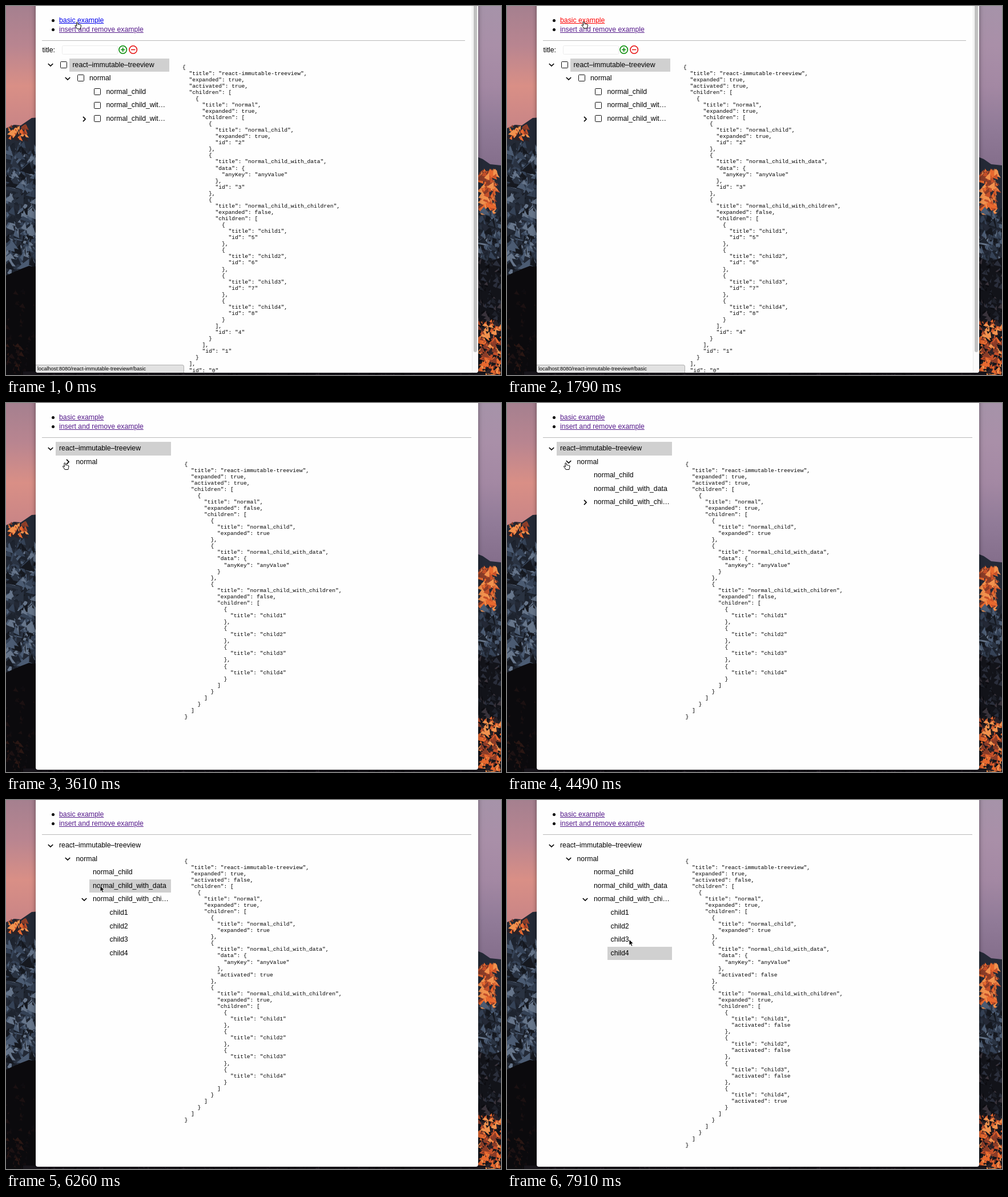
Animation of 867x646 px, one loop 8 s. Source, as an HTML page with a canvas:

```html
<!DOCTYPE html>
<html lang="en">
<head>
<meta charset="utf-8">
<title>Tree view demo</title>
<style>
html, body { margin: 0; width: 867px; height: 646px; overflow: hidden; background: #111; }
body { position: relative; font: 12.25px "Liberation Sans", Arial, sans-serif; color: #000; }
canvas, svg, #page, #page > * { position: absolute; }
#page { inset: 0; background: #fefefe; clip-path: inset(0 40px 4px 52px round 0 0 4px 4px); }
#links { left: 93px; top: 16.8px; line-height: 16.3px; }
#links div { position: relative; }
#links div::before { content: ""; position: absolute; left: -13.5px; top: 6px; width: 5px; height: 5px; border-radius: 50%; background: #000; }
#links span { text-decoration: underline; color: #551a8b; }
#rule { left: 63px; top: 60px; height: 1px; background: #b9b9b9; }
#form { left: 0; top: 0; }
#tree { left: 0; line-height: 23.6px; white-space: nowrap; }
.row { position: relative; height: 23.6px; }
.row svg { top: 4.8px; overflow: visible; }
.row i { position: absolute; top: 5.3px; width: 10px; height: 10px; border: 1.5px solid #111; border-radius: 1.5px; }
.label { padding-left: 6px; }
.on { background: #d0d0d0; }
.kids { overflow: hidden; }
pre { margin: 0; top: 101.5px; font: 9.58px/11.07px "Liberation Mono", "Courier New", monospace; }
pre mark { background: #b0d3fb; color: inherit; }
#track { left: 816px; top: 0; width: 11px; height: 642px; background: #fafafa; box-shadow: inset 1px 0 #e8e8e8; }
#track::before { content: ""; position: absolute; left: 3px; top: -4px; width: 6px; height: 610px; border-radius: 3px; background: #c1c1c1; }
#status { left: 51px; top: 628px; width: 256px; height: 13px; padding-left: 3px; border: 1px solid #b0b0b0; border-radius: 0 3px 0 0;
  background: #e2e2e2; font-size: 9px; line-height: 13px; box-sizing: content-box; }
</style>
</head>
<body>
<canvas id="wall" width="867" height="646"></canvas>
<div id="page">
  <div id="links"><div><span>basic example</span></div><div><span>insert and remove example</span></div></div>
  <div id="rule"></div>
  <svg id="form" width="300" height="90" fill="none" stroke-width="1.6">
    <text x="63.5" y="81" fill="#000">title:</text>
    <rect x="98.5" y="69.5" width="97" height="15" rx="2" stroke="#ececec" stroke-width="1"/>
    <path d="M201 76.5h7.4M204.7 72.8v7.4" stroke="#008a00"/><circle cx="204.7" cy="76.5" r="6.7" stroke="#008a00"/>
    <path d="M219 76.5h7.4" stroke="#e60f0f"/><circle cx="222.7" cy="76.5" r="6.7" stroke="#e60f0f"/>
  </svg>
  <div id="tree"></div>
  <pre id="json"></pre>
  <div id="track"></div>
  <div id="status"></div>
</div>
<svg width="867" height="646" style="left:0;top:0">
  <path id="hand" d="M-1.2 1Q0-.6 1 1L1.6 4.3Q3 3.6 3.6 4.6Q5 4 5.4 5Q7 4.6 7 6.5L6.5 9L5.8 12H0L-1.5 9.5L-3.6 6.8Q-3.4 5.4-2 6L-.6 7.2Z" fill="#fff" stroke="#000"/>
  <path id="arrow" d="M0 0V10.3L2.3 8.2L4 12L5.8 11.2L4.2 7.5H7.3Z" stroke="#fff" stroke-width=".8"/>
</svg>
<script>
const $ = id => document.getElementById(id);
const LOOP = 8000, ROW = 23.6, TURN = 300;
const ROOT = 'react-immutable-treeview';

// The screen refreshes in bursts: [from, to, number of intervals]
const bursts = [[0, 150, 1], [150, 860, 4], [860, 1150, 2], [1360, 1790, 3], [1790, 2260, 3],
  [2410, 2860, 3], [3160, 3610, 3], [3610, 4200, 4], [4350, 5370, 7], [5520, 6440, 6],
  [6590, 7180, 4], [7180, 7620, 3], [7760, 7910, 1]];
const ticks = bursts.flatMap(([a, b, n]) => Array.from({length: n + 1}, (_, i) => a + (b - a) * i / n));

// Pointer path: time, x, y
const path = [[0, 124.5, 28], [330, 124.5, 28], [860, 143.5, 44], [1360, 143.5, 44], [1790, 134.5, 27],
  [1940, 134.5, 27], [2260, 112, 108], [2710, 103, 104.5], [4350, 103, 104.5], [4780, 137.5, 180],
  [5520, 137.5, 180], [5980, 165, 150], [6440, 165, 150], [6735, 198, 196], [7030, 206, 219],
  [7180, 224, 240], [7470, 219, 244], [7620, 219, 244], [7760, 215, 266], [7910, 214, 244]];

const picks = [[0, ROOT], [6130, 'normal_child_with_data'], [6735, 'child1'], [7030, 'child2'],
  [7470, 'child3'], [7760, 'child4']];

const within = (t, a, b) => t >= a && t < b;
const clamp = v => Math.max(0, Math.min(1, v));

function pointer(t) {
  const i = path.findIndex(p => p[0] > t);
  if (i < 0) return path[path.length - 1].slice(1);
  const [a, x, y] = path[i - 1], [b, u, v] = path[i], k = (t - a) / (b - a);
  return [x + (u - x) * k, y + (v - y) * k];
}

function model(t, insert) {
  const nodes = {};
  const node = (id, title, rest) => nodes[title] = {title, ...rest, ...(insert && {id: String(id)})};
  const kids = [1, 2, 3, 4].map(n => node(n + 4, 'child' + n));
  const root = node(0, ROOT, {expanded: true, activated: true, children: [
    node(1, 'normal', {expanded: !within(t, 3160, 3755), children: [
      node(2, 'normal_child', {expanded: true}),
      node(3, 'normal_child_with_data', {data: {anyKey: 'anyValue'}}),
      node(4, 'normal_child_with_children', {expanded: t >= 5220, children: kids})
    ]})
  ]});
  const past = picks.filter(p => p[0] <= t);
  past.forEach(([, title], i) => nodes[title].activated = i === past.length - 1);
  return root;
}

// How far a node is unfolded, 0 to 1
function unfold(title, t) {
  if (title === 'normal') return t < 3755 ? 1 - clamp((t - 3160) / TURN) : clamp((t - 3755) / TURN);
  if (title === 'normal_child_with_children') return clamp((t - 5220) / TURN);
  return 1;
}

function rows(node, t, insert, depth = 0) {
  const {title, children, activated} = node;
  const x = 78 + 29.5 * depth, max = insert ? 16 : 22;
  let label = title.replace(/-/g, '\u2013');
  if (depth > 1 && label.length > max) label = label.slice(0, Math.min(max, 21)) + '\u2026';
  const open = unfold(title, t);
  let html = '<div class="row">';
  if (children) html += `<svg width="14" height="14" viewBox="-7 -7 14 14" style="left:${x - 7}px">
    <path d="M-2-4.2L2 0L-2 4.2" transform="rotate(${90 * open})" fill="none" stroke="#000" stroke-width="1.7"/></svg>`;
  if (insert) html += `<i style="left:${x + 17}px"></i>`;
  html += `<div class="label${activated ? ' on' : ''}" style="margin-left:${x + (insert ? 32.5 : 9)}px">${label}</div></div>`;
  if (children && open > 0) {
    const height = open < 1 ? `height:${children.length * ROW * open}px` : '';
    html += `<div class="kids" style="${height}">${children.map(c => rows(c, t, insert, depth + 1)).join('')}</div>`;
  }
  return html;
}

function draw(t) {
  const insert = t < 320 || within(t, 1000, 1935);
  const root = model(t, insert);
  const [basic, edit] = document.querySelectorAll('#links span');
  basic.style.color = within(t, 150, 320) || within(t, 1785, 1935) ? '#f00' : t < 150 ? '#00e' : '';
  edit.style.color = within(t, 855, 1000) ? '#f00' : '';
  $('rule').style.width = (insert ? 741 : 752) + 'px';
  $('form').style.display = $('track').style.display = insert ? '' : 'none';

  $('tree').style.top = (insert ? 91.6 : 68) + 'px';
  $('tree').style.width = (insert ? 286 : 289) + 'px';
  $('tree').innerHTML = rows(root, t, insert);
  const text = JSON.stringify(root, null, 2);
  $('json').style.left = (insert ? 309 : 312.5) + 'px';
  $('json').innerHTML = within(t, 5220, 5975) ? '<mark>{</mark>' + text.slice(1) : text;

  const [x, y] = pointer(t);
  const onEdit = within(t, 500, 1500);
  $('status').textContent = `localhost:8080/${ROOT}#/${onEdit ? 'insert_remove' : 'basic'}`;
  $('status').style.opacity = 1 - clamp((t - 2200) / 500);

  const hand = t < 2080 || within(t, 2550, 5600);
  $('hand').style.display = hand ? '' : 'none';
  $('arrow').style.display = hand ? 'none' : '';
  $(hand ? 'hand' : 'arrow').setAttribute('transform', `translate(${x} ${y})`);
}

function wallpaper() {
  const g = $('wall').getContext('2d');
  let seed = 7;
  const rnd = () => (seed = seed * 16807 % 2147483647) / 2147483647;
  const sky = (x, w, stops) => {
    const fill = g.createLinearGradient(0, 0, 0, 280);
    stops.forEach((c, i) => fill.addColorStop(i / (stops.length - 1), c));
    g.fillStyle = fill;
    g.fillRect(x, 0, w, 646);
  };
  const shape = (color, pts) => {
    g.beginPath();
    pts.forEach(p => g.lineTo(...p));
    g.fillStyle = color;
    g.fill();
  };
  const shards = (x, y, w, h, n, size, colors) => {
    for (let i = 0; i < n; i++) {
      const a = x + rnd() * w, b = y + rnd() * h, s = size * (.4 + rnd());
      shape(colors[Math.floor(rnd() * colors.length)],
        [[a, b], [a + s * (rnd() - .2), b + s], [a - s * rnd(), b + s * .7]]);
    }
  };
  const slate = ['#4b5b72', '#2a3342', '#15181f', '#66758a', '#1d232e', '#354256'];
  const fire = ['#e8692f', '#c4502a', '#f2924e', '#8a3c28', '#2b2126'];

  sky(0, 60, ['#a5808f', '#b98590', '#d98f86', '#c98586', '#a4707e']);
  sky(820, 47, ['#a693a9', '#a98fa8', '#a388a3', '#917b98', '#846e8b']);

  shape('#232935', [[0, 214], [14, 208], [26, 209], [45, 196], [60, 195], [60, 646], [0, 646]]);
  shards(4, 206, 32, 22, 45, 9, fire);
  shards(0, 236, 56, 225, 330, 15, slate);
  shape('#0b0a0d', [[0, 472], [22, 462], [40, 455], [60, 458], [60, 646], [0, 646]]);
  shards(0, 490, 54, 150, 50, 7, ['#140e10', '#1b1112', '#0e0c10']);
  shards(0, 590, 30, 50, 25, 7, ['#2a1714', '#1d1213']);

  shape('#242936', [[820, 262], [835, 268], [848, 277], [867, 279], [867, 646], [820, 646]]);
  shards(832, 284, 28, 72, 120, 12, fire.slice(0, 4));
  shards(824, 350, 45, 90, 120, 13, slate);
  shape('#121319', [[820, 436], [845, 448], [867, 440], [867, 646], [820, 646]]);
  shards(824, 440, 45, 120, 80, 9, ['#1d2029', '#2a2e3b', '#0c0c10', '#39333b']);
  shards(828, 548, 42, 90, 190, 9, fire);

  g.fillStyle = '#17141a';
  g.fillRect(30, 640, 810, 6);
  shards(60, 641, 760, 4, 120, 4, ['#0e0c11', '#28222b', '#1e1a22']);
  g.shadowColor = 'rgba(0,0,0,.5)';
  g.shadowBlur = 9;
  g.fillStyle = '#fff';
  g.fillRect(53, -20, 773, 661);
}

let shown = -1;
function frame() {
  const now = performance.now() % LOOP;
  const t = Math.max(...ticks.filter(k => k <= now));
  if (t !== shown) draw(shown = t);
  requestAnimationFrame(frame);
}
wallpaper();
frame();
</script>
</body>
</html>
```
